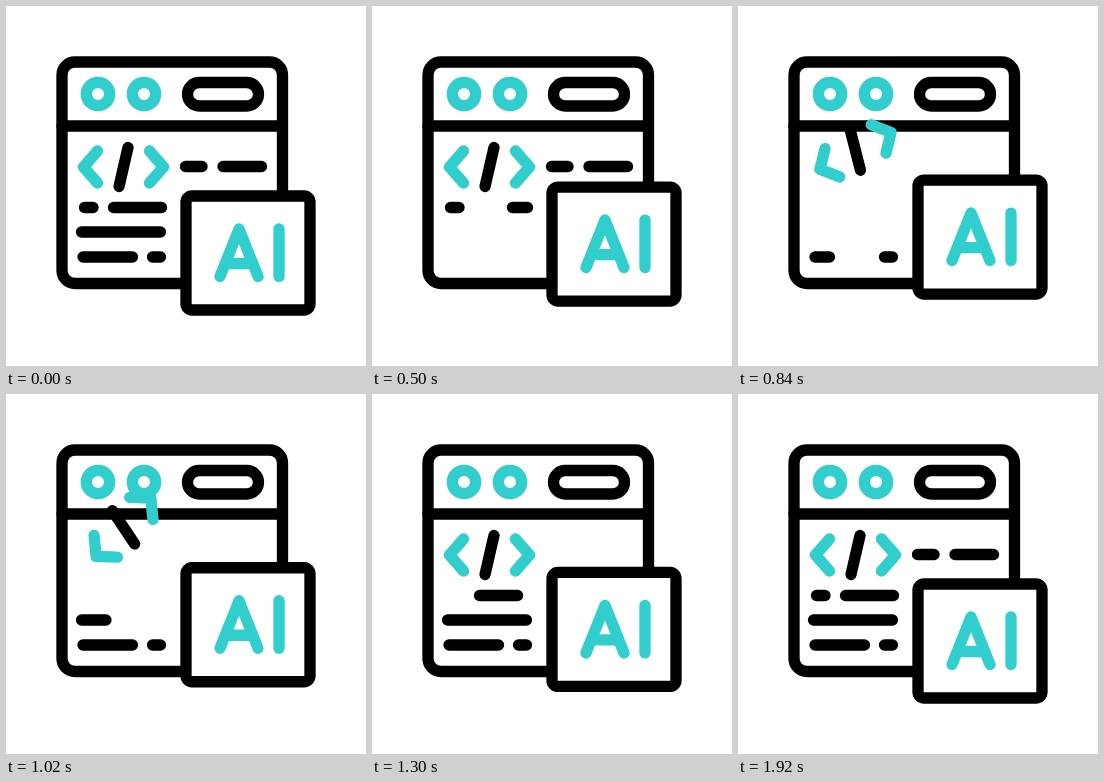
An HTML page with a canvas for the animation above (1960 ms loop, 360x360 px).

```html
<!DOCTYPE html>
<html lang="en">
<head>
<meta charset="utf-8">
<title>AI code window</title>
<style>
html, body { margin: 0; width: 100%; height: 100%; overflow: hidden; background: #fff; }
canvas { display: block; width: 360px; height: 360px; }
</style>
</head>
<body>
<canvas id="stage"></canvas>
<script>
const LOOP = 1960, INK = '#000', TEAL = '#32cdcd';
const canvas = document.getElementById('stage');
const ctx = canvas.getContext('2d');
const dpr = window.devicePixelRatio || 1;
canvas.width = canvas.height = 360 * dpr;

// Code dashes as [x1, x2, y], in the order they are trimmed
const dashes = [
  [146.5, 154.5, 251], [77, 126.5, 251],
  [75.5, 154.5, 226],
  [107.5, 155.5, 201.5], [78.5, 87, 201.5],
  [217, 255.5, 160.5], [179.5, 196, 160.5]
];
const total = dashes.reduce((sum, [a, b]) => sum + b - a, 0);

const clamp = v => Math.min(1, Math.max(0, v));
const span = (t, from, to) => clamp((t - from) / (to - from));
const swell = u => (1 - Math.cos(2 * Math.PI * u)) / 2;

function line(color, ...pts) {
  ctx.strokeStyle = color;
  ctx.beginPath();
  for (let i = 0; i < pts.length; i += 2) ctx.lineTo(pts[i], pts[i + 1]);
  ctx.stroke();
}

function box(x, y, w, h, r) {
  ctx.strokeStyle = INK;
  ctx.fillStyle = '#fff';
  ctx.beginPath();
  ctx.roundRect(x, y, w, h, r);
  ctx.fill();
  ctx.stroke();
}

function ring(x, y) {
  ctx.strokeStyle = TEAL;
  ctx.beginPath();
  ctx.arc(x, y, 11.7, 0, 2 * Math.PI);
  ctx.stroke();
}

function drawWindow() {
  box(56, 56, 220.5, 221.5, 13);
  line(INK, 56, 120, 276, 120);
  ring(92, 88);
  ring(138, 88);
  box(181.5, 76.5, 71, 23.5, 11.75);
}

// Draws the part of the dashes between two distances along their joined length
function drawDashes(from, to) {
  let pos = 0;
  for (const [a, b, y] of dashes) {
    const len = b - a;
    const s = Math.max(from - pos, 0), e = Math.min(to - pos, len);
    if (e - s > 0.01) line(INK, a + s, y, a + e, y);
    pos += len;
  }
}

function drawTag(lift) {
  ctx.save();
  ctx.translate(117.5, 161 - 29 * lift);
  ctx.rotate(-49 * lift * Math.PI / 180);
  line(TEAL, -26, -16, -40, 0, -26, 16);
  line(TEAL, 26, -16, 40, 0, 26, 16);
  line(INK, 4.5, -19.5, -4.5, 19.5);
  ctx.restore();
}

function drawChip(lift) {
  ctx.save();
  ctx.translate(0, -16.5 * lift);
  box(180, 190, 124, 114, 6);
  line(TEAL, 214, 270.5, 233, 223, 252, 270.5);
  line(TEAL, 220, 257.5, 246, 257.5);
  line(TEAL, 273, 223, 273, 270.5);
  ctx.restore();
}

function draw(t) {
  ctx.setTransform(dpr, 0, 0, dpr, 0, 0);
  ctx.fillStyle = '#fff';
  ctx.fillRect(0, 0, 360, 360);
  ctx.lineWidth = 11.3;
  ctx.lineCap = ctx.lineJoin = 'round';

  drawWindow();
  if (t < 720) drawDashes(total * span(t, 132, 672), total);
  else drawDashes(0, total * span(t, 773, 1523));
  drawTag(swell(span(t, 680, 1280)));
  drawChip(swell(span(t, 0, 1900)));
}

const start = performance.now();
function tick() {
  draw((performance.now() - start) % LOOP);
  requestAnimationFrame(tick);
}
tick();
</script>
</body>
</html>
```
